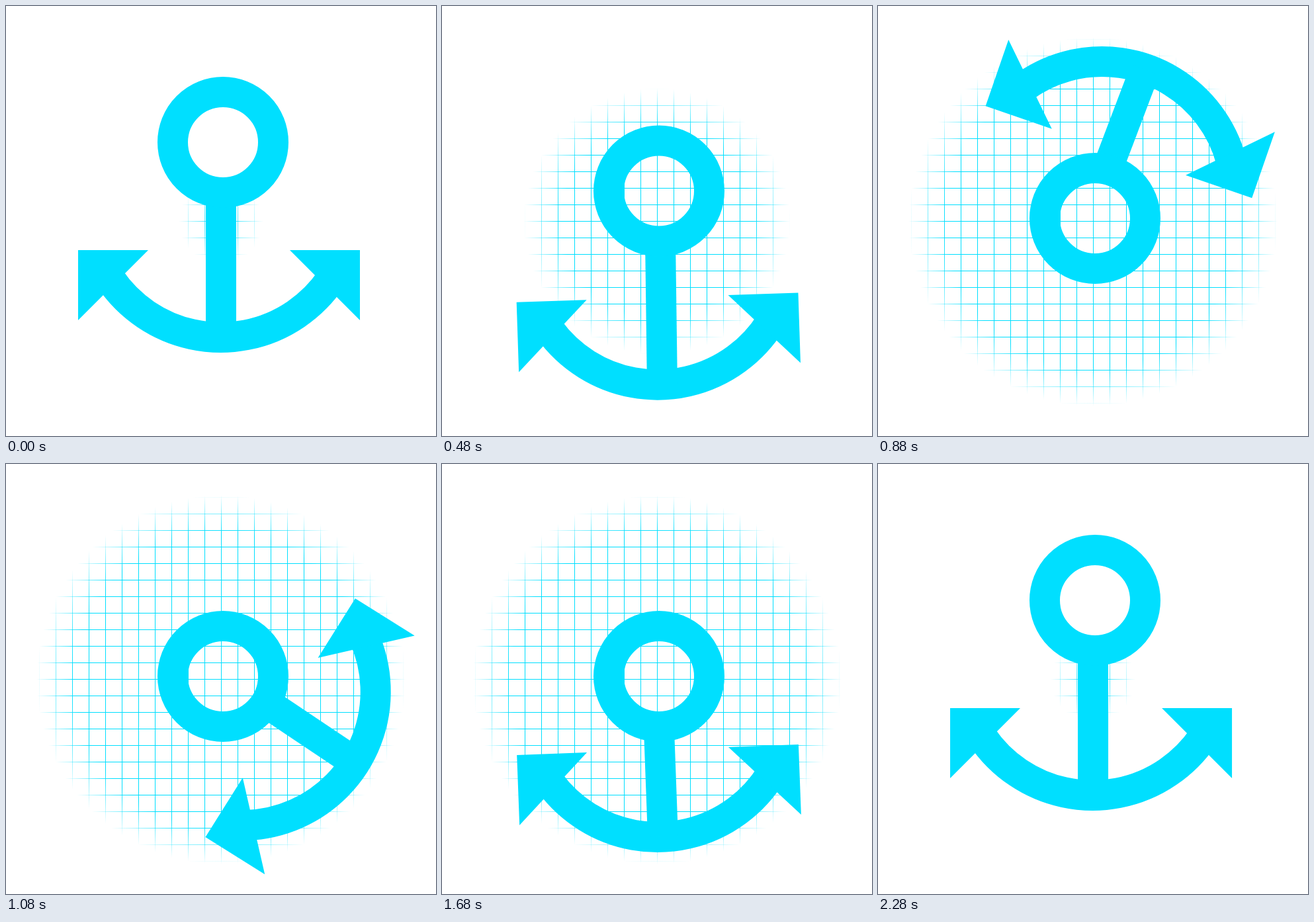
These frames come from a looping animation (650 by 650 pixels, 2.32 s). An HTML page with a canvas:

```html
<!DOCTYPE html>
<html lang="en">
<head>
<meta charset="utf-8">
<title>Anchor</title>
<style>
  html, body { margin: 0; width: 100%; height: 100%; overflow: hidden; background: #fff; }
  canvas { display: block; }
</style>
</head>
<body>
<canvas id="stage" width="650" height="650"></canvas>
<script>
const ctx = document.getElementById('stage').getContext('2d');
const CYAN = '#00dfff', CLEAR = 'rgba(0,223,255,0)';
const LOOP = 2320, STEP = 40, TAU = Math.PI * 2;
const LAND = 600, WIND = 365, PEAK = 1320, RISE = 1680, REST = 2280;

const rad = deg => deg * Math.PI / 180;
const mix = (a, b, p) => a + (b - a) * p;
const part = (t, from, to) => Math.min(1, Math.max(0, (t - from) / (to - from)));
const smooth = p => p * p * (3 - 2 * p);
const cubic = p => p < .5 ? 4 * p ** 3 : 1 - 4 * (1 - p) ** 3;
const swing = (t, decay, half) => Math.exp(-t / decay) * Math.cos(Math.PI * t / half);

// Constant speed, with a share a of the time spent speeding up and slowing down.
function cruise(p, a) {
  const k = 2 * a * (1 - a);
  if (p < a) return p * p / k;
  if (p > 1 - a) return 1 - (1 - p) ** 2 / k;
  return (p - a / 2) / (1 - a);
}

// Wind up backwards, spin past a full turn, swing to rest.
function angle(t) {
  if (t < WIND) return -21.5 * (t / WIND) ** 5;
  if (t < PEAK) return mix(-21.5, 381, cruise(part(t, WIND, PEAK), .182));
  return 360 + 21 * swing(t - PEAK, 158, 360);
}

const back = t => cubic(part(t, RISE, REST));
const ringY = t => 206 + 115 * (part(t, 0, LAND) ** 2 - back(t));
const gridR = t => 62 + 215 * (1 - (1 - part(t, 320, 720)) ** 2 - back(t));

// Drop past the resting height, then bounce back to it.
function bodyY(t) {
  if (t < LAND) return mix(261.5, 366, smooth((t / LAND) ** 2.1));
  return mix(324.5, 261.5, back(t)) + 41.5 * swing(t - LAND, 140, 400);
}

function drawGrid(r) {
  const fade = ctx.createRadialGradient(325, 326, Math.max(0, r - 55), 325, 326, r + 2);
  fade.addColorStop(0, CYAN);
  fade.addColorStop(1, CLEAR);
  ctx.fillStyle = fade;
  for (let p = 25; p < 650; p += 25) {
    ctx.fillRect(p, 0, 1, 650);
    ctx.fillRect(0, p, 650, 1);
  }
}

function turn(x, y, deg, toX = x, toY = y) {
  ctx.translate(toX, toY);
  ctx.rotate(rad(deg));
  ctx.translate(-x, -y);
}

function drawTip(x, y, size) {
  ctx.beginPath();
  ctx.moveTo(x, y);
  ctx.lineTo(x + size, y);
  ctx.lineTo(x, y + Math.abs(size));
  ctx.fill();
}

function drawBody(y, deg, tilt, holeY) {
  ctx.save();
  // Keep the stem out of the ring's hole.
  ctx.beginPath();
  ctx.rect(0, 0, 650, 650);
  ctx.arc(328, holeY, 54, 0, TAU);
  ctx.clip('evenodd');
  turn(325.5, 261.5, deg, 325.5, y);
  ctx.beginPath();
  ctx.arc(324.5, 299, 202, rad(34), rad(146));
  ctx.stroke();
  drawTip(109, 369, 106);
  drawTip(535, 369, -106);
  // The foot of the stem trails the spin slightly.
  turn(325, 500, tilt);
  ctx.fillRect(302, 278, 46, 222);
  ctx.restore();
}

function draw(t) {
  ctx.clearRect(0, 0, 650, 650);
  drawGrid(gridR(t));
  ctx.fillStyle = ctx.strokeStyle = CYAN;
  ctx.lineWidth = 46;
  const y = ringY(t), deg = angle(t);
  drawBody(bodyY(t), deg, angle(t + 3.3) - deg, y);
  ctx.beginPath();
  ctx.arc(328, y, 76, 0, TAU);
  ctx.stroke();
}

const start = performance.now();
function tick() {
  const t = (performance.now() - start) % LOOP;
  draw(Math.floor(t / STEP) * STEP);
  requestAnimationFrame(tick);
}
tick();
</script>
</body>
</html>
```
